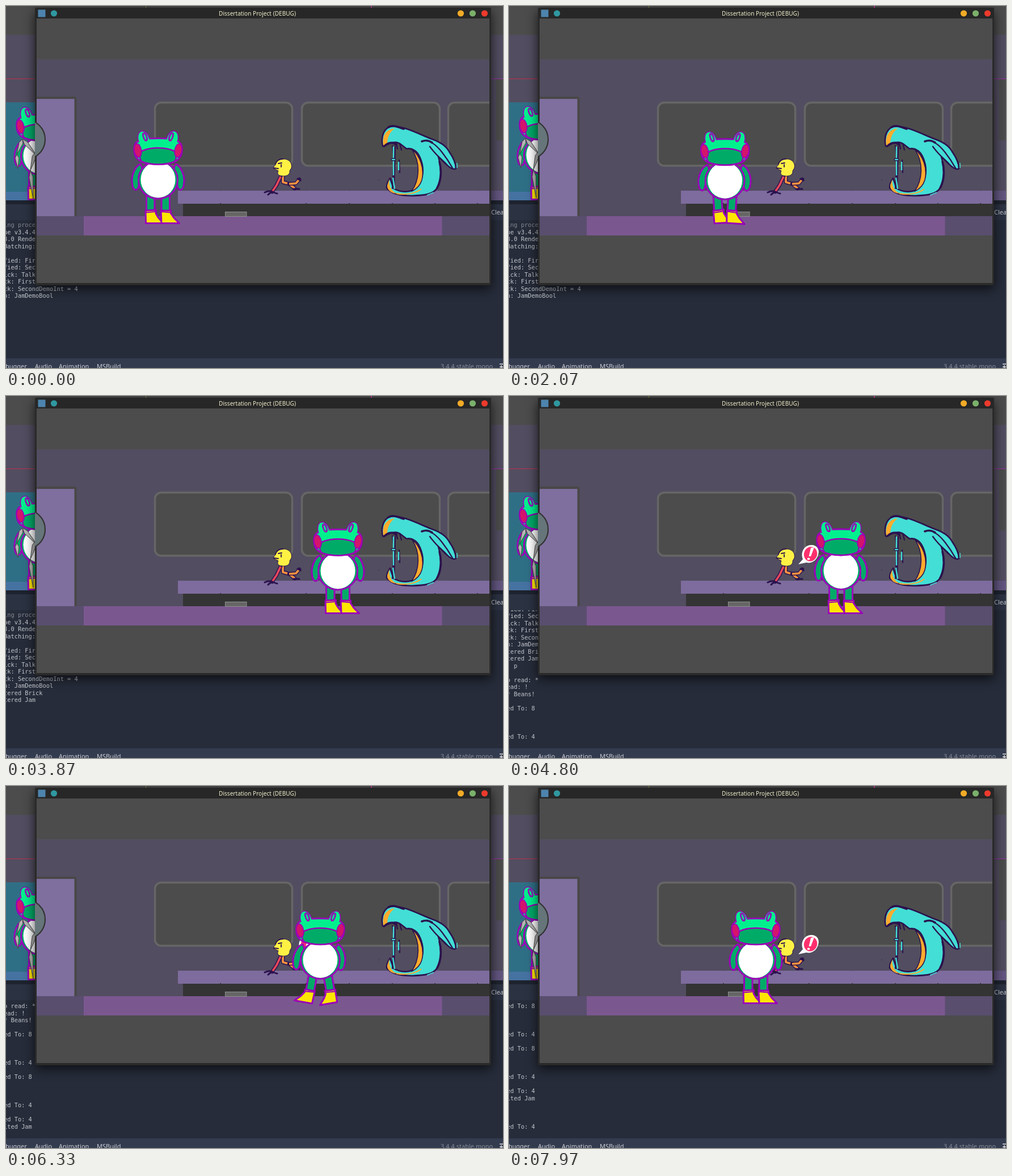
An HTML page for the animation above (8000 ms loop, 876 px wide and 639 px high).

```html
<!DOCTYPE html>
<html lang="en">
<head>
<meta charset="utf-8">
<title>Debug window</title>
<style>
html, body { margin: 0; width: 100%; height: 100%; overflow: hidden; background: #262c3a; }
svg { display: block; width: 876px; height: 639px; }
.ui { font: 11px "Noto Sans", sans-serif; fill: #cdcfd4; }
.log { font: 10.35px "DejaVu Sans Mono", monospace; fill: #c3c6cc; white-space: pre; }
.frog { stroke: #9b00b8; stroke-width: 3; stroke-linejoin: round; }
.ink { stroke: #2b124e; stroke-linejoin: round; stroke-linecap: round; }
</style>
</head>
<body>
<svg id="stage" viewBox="0 0 876 639" xmlns="http://www.w3.org/2000/svg"></svg>
<script>
const LOOP = 8000;
const stage = document.getElementById('stage');

const rect = (x, y, w, h, fill, more = '') =>
  `<rect x="${x}" y="${y}" width="${w}" height="${h}" fill="${fill}" ${more}/>`;
const path = (d, fill = 'none', more = '') => `<path d="${d}" fill="${fill}" ${more}/>`;
const oval = (x, y, rx, ry, fill, turn = 0, more = '') =>
  `<ellipse cx="${x}" cy="${y}" rx="${rx}" ry="${ry}" fill="${fill}" transform="rotate(${turn} ${x} ${y})" ${more}/>`;
const label = (x, y, s, more = '') => `<text class="ui" x="${x}" y="${y}" ${more}>${s}</text>`;

// Console lines with the time each batch is printed
const batches = [
  [0, 'ing proce', 'ne v3.4.4', '3.0 Rende', 'Batching:', '', 'fied: Fir', 'fied: Sec', 'ick: Talk',
    'ck: First', 'ck: SecondDemoInt = 4', 'n: JamDemoBool'],
  [2100, 'tered Brick'],
  [2950, 'tered Jam'],
  [4000, '  p', '', 'o read: *', 'ead: !', '* Beans!'],
  [4300, '', 'ed To: 8'],
  [4700, '', '', '', 'ed To: 4'],
  [4900, '', 'ed To: 8'],
  [5250, '', '', '', 'ed To: 4'],
  [5500, '', 'ed To: 4'],
  [6200, 'ited Jam'],
  [7450, '', '', '', 'ed To: 4']
];
const lines = batches.flatMap(([at, ...texts]) => texts.map(text => ({ at, text })));
const ROW = 12.49, LOG_TOP = 390.2, LOG_END = 604.6;

function frog(id) {
  const light = '#00f08e', dark = '#00ab68', yellow = '#ffe500';
  const leg = (side, x, boot, cuff) => `<g id="${id}-leg${side}">
    ${rect(x, 330, 14.5, 34, dark)}${path(boot, yellow)}${path(cuff, 'none', 'stroke-width="2"')}</g>`;
  const arm = side => `<g id="${id}-arm${side}"><g transform="scale(${side ? 1 : -1} 1)">${path(
    'M31 279C41 283 48 301 45.5 314C45 322 41 326 37.5 324C32 321 35 312 32 304L27 288Z', dark)}</g></g>`;
  const ears = more => [-1, 1].map(s => oval(s * 25, 236, 9.2, 15, light, s * 17, more)).join('');
  return `<g id="${id}" class="frog">
    ${leg(0, -20.5, 'M-22 361L-3.5 360L-4 366L0 373L9 383.5H-21.5Z', 'M-22 364.5L-4 363')}
    ${leg(1, 6, 'M5 361L22.5 361L22.5 366L28 374L37.5 383.5H6Z', 'M5 363L22 364.5')}
    <g id="${id}-top">
      ${arm(0)}${arm(1)}
      ${oval(0, 307, 34.5, 33, dark)}
      ${oval(0, 306.5, 30.5, 32, '#fff', 0, 'stroke="none"')}
      ${ears('')}
      ${path('M-42 255C-43 245-39 240-33 238C-22 232 22 232 33 238C39 240 43 245 42 255C42 267 35 272 29 275C12 281-12 281-29 275C-35 272-42 267-42 255Z', light)}
      ${ears('stroke="none"')}
      ${path('M-32 258C-16 248 16 248 32 258C33 267 32 272 28 275C12 281-12 281-28 275C-32 272-33 267-32 258Z', dark, 'stroke-width="2.5"')}
      ${[-1, 1].map(s => oval(s * 35.8, 255, 6.3, 12, '#d3146c', s * 10, 'stroke-width="1.8"')
        + oval(s * 23, 231, 2.8, 7, light, s * 20, 'stroke-width="2.5"')).join('')}
    </g></g>`;
}

// Skeleton overlay: a kite whose widest point sits near its root
function bone(x1, y1, x2, y2) {
  const dx = x2 - x1, dy = y2 - y1, k = 3.5 / Math.hypot(dx, dy);
  const mx = x1 + dx * .25, my = y1 + dy * .25;
  return path(`M${x1} ${y1}L${mx - dy * k} ${my + dx * k}L${x2} ${y2}L${mx + dy * k} ${my - dx * k}Z`,
    '#b5b5b5', 'stroke="#444" stroke-width="1"');
}

function editor() {
  return rect(0, 0, 876, 343, '#524d60') + rect(0, 0, 876, 51, '#4c4c4c')
    + rect(864, 129, 12, 108, '#4c4c4c')
    + rect(0, 128, 51, 1, '#c0304e') + rect(855, 128, 21, 1, '#a02ca8')
    + rect(246, 0, 1, 4, '#7b9a32') + rect(643, 0, 2, 4, '#c0409c')
    + rect(0, 170, 60, 158, '#2f6f86') + rect(0, 328, 60, 15, '#4672a2')
    + rect(855, 326, 21, 17, '#635680')
    + frog('ghost') + `<g id="bones">${bone(29, 235, 19, 262)}${bone(19, 262, 21, 287)}${
      bone(29, 235, 54, 264)}${bone(52, 258, 43, 290)}${bone(43, 290, 48, 340)}</g>`
    + rect(0, 343, 876, 296, '#1e232f') + rect(0, 350, 876, 28, '#2b3242')
    + rect(0, 378, 876, 244, '#262c3a')
    + `<g clip-path="url(#logBox)"><g id="scroll">${lines.map((l, i) =>
      `<text class="log" x="-4" y="${LOG_TOP + i * ROW}" ${i ? '' : 'opacity=".6"'}>${l.text}</text>`).join('')}</g></g>`
    + label(855, 368, 'Clear')
    + rect(0, 622, 876, 17, '#333b4f')
    + label(-1, 640, 'bugger') + label(51, 640, 'Audio') + label(93, 640, 'Animation') + label(160, 640, 'MSBuild')
    + label(766, 640, '3.4.4.stable.mono', 'opacity=".55"')
    + path('M870 632H876M870 637H876M873 634V639', 'none', 'stroke="#ddd" stroke-width="1.5"');
}

function room() {
  const pane = (x, w) => rect(x, 170.5, w, 111.5, '#4c4c4c', 'rx="11" stroke="#666" stroke-width="3.5"');
  return rect(54, 22, 798, 467, '#4c4c4c') + rect(54, 94, 798, 278, '#524d60')
    + rect(48, 162, 74.5, 215, '#7f6f9f', 'rx="2" stroke="#494747" stroke-width="4"')
    + pane(262.5, 242) + pane(521.5, 243) + pane(779.5, 120)
    + rect(303, 326, 549, 23, '#7d6c9d') + rect(312, 349, 540, 23, '#343434')
    + [378, 529, 605, 681, 756, 831].map(x => rect(x, 325, 1, 1.5, '#4c4560') + rect(x - 1, 348, 2, 1.5, '#343434')).join('')
    + rect(54, 371, 798, 34, '#594e6e') + rect(137, 371, 631.5, 34, '#7b5790')
    + rect(386.5, 363.5, 37.5, 8, '#666', 'stroke="#909090" stroke-width="1"');
}

function runner() {
  const limb = (d, color) => path(d, 'none', 'class="ink" stroke-width="6.5"')
    + path(d, 'none', `stroke="${color}" stroke-width="3.6" stroke-linejoin="round"`);
  return limb('M488 300L488 311L499 314L509 322', '#ff9440')
    + limb('M499 314L511 313L517 306', '#ff9440')
    + limb('M484 301L477 316L469 328', '#e9485c')
    + path('M456 329Q464 325 470 328T478 331M468 328L462 333M506 323L517 323M514 305L519 308', 'none', 'class="ink" stroke-width="3"')
    + path('M475 280C476 273 482 270 489 270C499 270 505 277 503 286L500 291C501 298 494 301 487 300C480 300 477 296 480 291L472 287L472 284Z',
      '#fff144', 'class="ink" stroke-width="1"')
    + path('M475 279C477 273 482 270 488 270M485 280L485 284M472 286L480 287M480 278L486 277', 'none', 'class="ink" stroke-width="1.8"');
}

function beast() {
  const cyan = '#43ded5', gold = '#ffab2e';
  return path('M664 247C660 229 667 213 682 212C704 213 728 226 748 234C766 240 776 247 781 257C788 267 793 277 793 287C788 290 781 285 774 277L762 266C768 286 768 307 760 321C753 333 737 334 716 335C694 335 678 331 671 321C671 315 673 309 677 304L683 322C694 329 712 330 722 322C736 309 738 287 730 268C725 256 716 250 706 252L697 245C689 238 678 240 666 248Z',
      cyan, 'class="ink" stroke-width="2.6"')
    + path('M665 246C663 229 669 218 685 216C676 223 672 232 672 244Z', gold)
    + path('M716 254C729 264 738 286 733 307C730 317 724 323 715 327C729 307 731 277 716 254Z', gold, 'class="ink" stroke-width="1.5"')
    + path('M676 305C674 316 678 326 689 331C680 331 671 325 672 316Z', gold)
    + path('M688 331C705 334 722 331 732 323', 'none', `stroke="${gold}" stroke-width="2"`)
    + path('M674 214C682 209 691 214 701 217M667 247C675 240 682 240 688 245M733 239C740 236 745 237 751 241M764 275C768 290 767 308 760 321', 'none', 'class="ink" stroke-width="3.6"')
    + path('M749 241C761 245 778 270 787 286M747 248C755 260 766 269 775 279M688 243L690 252M694 243L697 254', 'none', 'class="ink" stroke-width="2.3"')
    + path('M681 247L684 270L681 322M686 248L684 322M693 272L694 294', 'none', 'class="ink" stroke-width="2.2"')
    + path('M683 248L683 299M682 303L685 323M692 275V290', 'none', `stroke="${cyan}" stroke-width="2.4"`)
    + oval(683, 271, 4, 2, cyan, 0, 'class="ink" stroke-width="1.3"')
    + path('M742 334L754 329M795 277V286', 'none', `stroke="${cyan}" stroke-width="1.5"`)
    + rect(656, 306, 2, 2, '#3b4150');
}

const bubble = () => `<g id="bubble">${path('M510 297L518 288C513 275 521 263 533 263C543 263 548 271 545 280C542 291 533 296 524 294Z', '#fff')}
  ${oval(531.5, 279, 11.5, 13, '#ff2f6d', 20)}${path('M532 268L538 267L532 283L528.5 283Z', '#fff')}${oval(528, 287.5, 2.3, 2.1, '#fff')}</g>`;

const dot = (x, color) => `<circle cx="${x}" cy="13" r="5.6" fill="${color}"/>`;

stage.innerHTML = `<defs>
    <clipPath id="logBox">${rect(0, 378, 862, 238, '#000')}</clipPath>
    <clipPath id="view">${rect(54, 22, 798, 467, '#000')}</clipPath>
    <clipPath id="frame">${rect(51, 3, 804, 490, '#000')}</clipPath>
  </defs>
  ${editor()}
  ${rect(51, 3, 804, 490, '#2a2a2a', 'rx="3" style="filter:drop-shadow(0 6px 10px rgba(0,0,0,.7))"')}
  ${rect(51, 3, 804, 19.5, '#272727', 'rx="3"')}
  ${rect(56.5, 6.5, 13, 13, '#4d84ad')}${dot(84.5, '#2f98a0')}
  ${label(443, 17, 'Dissertation Project (DEBUG)', 'text-anchor="middle" style="font-size:10.1px;fill:#f2eecb"')}
  ${dot(801.5, '#f2ab27')}${dot(822.5, '#7bb16b')}${dot(843.5, '#ed3a2d')}
  <g clip-path="url(#view)">${room()}${runner()}${beast()}${bubble()}${frog('hero')}</g>
  <circle cx="34" cy="235.5" r="35" fill="#667579" stroke="#333" stroke-width="2.2" clip-path="url(#frame)"/>`;

const el = id => document.getElementById(id);
const rows = [...stage.querySelectorAll('.log')];

// Walking path: [time, x]
const track = [[0, 268], [1200, 268], [1370, 290], [1900, 358], [2830, 481], [3640, 585], [5450, 585],
  [5500, 587], [6020, 587], [6330, 554], [6970, 469.5], [7300, 446], [7440, 435], [LOOP, 435]];

function stepAt(t) {
  const i = track.findIndex(([at]) => at > t);
  const [t0, x0] = track[i - 1], [t1, x1] = track[i];
  return { x: x0 + (x1 - x0) * (t - t0) / (t1 - t0), moving: Math.abs(x1 - x0) > 5 };
}

function pose(id, x, y, face, bob, swing) {
  const set = (part, v) => el(id + part).setAttribute('transform', v);
  set('', `translate(${x} ${y}) scale(${face} 1)`);
  set('-top', `translate(0 ${bob})`);
  set('-leg0', `rotate(${swing * 14} -14 335)`);
  set('-leg1', `rotate(${-swing * 14} 13 335)`);
  set('-arm0', `rotate(${-swing * 6} -31 281)`);
  set('-arm1', `rotate(${-swing * 6} 31 281)`);
}

function draw(t) {
  const breath = 1 - Math.cos(t / 7000 * 2 * Math.PI);
  const { x, moving } = stepAt(t);
  const left = t >= 5480 && t < 7550;
  const swing = moving ? Math.sin((t - (left ? 6970 : 1370)) / 365 * Math.PI) : 0;
  pose('hero', x, 0, left ? -1 : 1, breath, swing);
  pose('ghost', 61, -42, 1, -breath, 0);
  el('bones').setAttribute('transform', `translate(0 ${-breath})`);
  el('bubble').style.display = t >= 4050 ? '' : 'none';

  const shown = lines.filter(l => l.at <= t).length;
  rows.forEach((r, i) => { r.style.display = i < shown ? '' : 'none'; });
  const shift = Math.min(0, LOG_END - LOG_TOP - (shown - 1) * ROW);
  el('scroll').setAttribute('transform', `translate(0 ${shift})`);
}

const start = performance.now();
function tick() {
  draw((performance.now() - start) % LOOP);
  requestAnimationFrame(tick);
}
tick();
</script>
</body>
</html>
```
